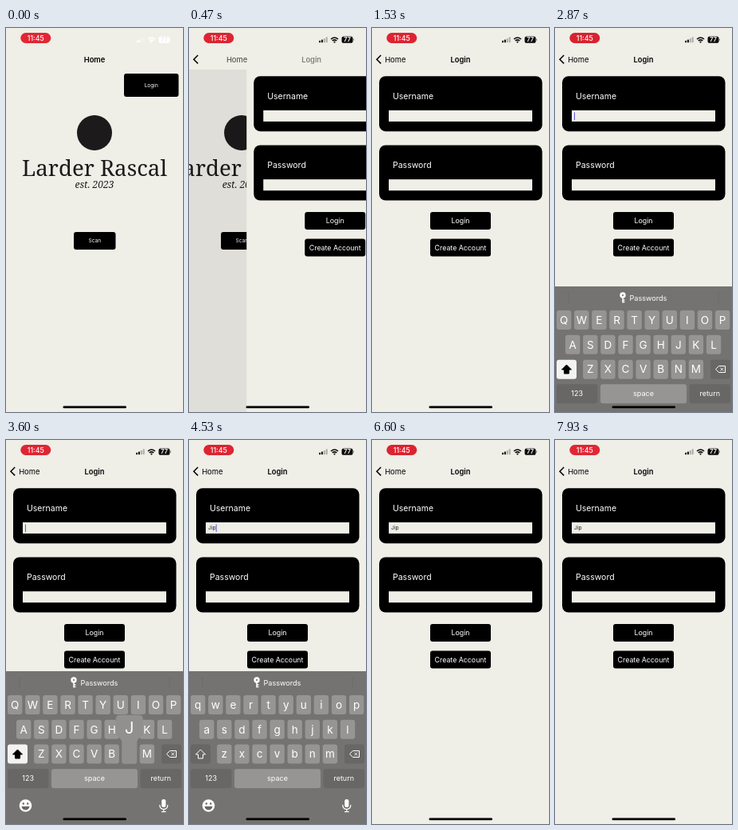
Write an HTML page that moves like this. It is 222 px wide and 480 px high and loops after 8000 ms.

```html
<!DOCTYPE html>
<html lang="en">
<head>
<meta charset="utf-8">
<title>Login flow</title>
<style>
html, body { margin: 0; width: 100%; height: 100%; overflow: hidden; background: #efeee7; }
svg { display: block; width: 100vw; height: 100vh; font-family: Inter, Roboto, sans-serif; }
.serif { font-family: "Noto Serif", serif; }
</style>
</head>
<body>
<svg id="stage" viewBox="0 0 222 480"></svg>
<script>
const BG = '#efeee7', KEY = '#969593', DARK_KEY = '#686765';
const LOOP = 8000, PUSH = 344, FOCUS = 2699, BLUR = 4800, LOWER = 3670;
const NAME = 'Jip';
// when each key bubble shows and hides
const TAPS = [[3590, 3720], [3930, 4060], [4330, 4460]];
const ROWS = ['QWERTYUIOP', 'ASDFGHJKL', 'ZXCVBNM'];
const rowX = [11.2, 22.2, 44.3], PITCH = 22.1;

const rect = (x, y, w, h, fill, r = 0, more = '') =>
  `<rect x="${x}" y="${y}" width="${w}" height="${h}" rx="${r}" fill="${fill}" ${more}/>`;
const text = (x, y, s, size, fill, more = '') =>
  `<text x="${x}" y="${y + size * .36}" font-size="${size}" fill="${fill}" text-anchor="middle" ${more}>${s}</text>`;
const left = (x, y, s, size, fill, more = '') =>
  text(x, y, s, size, fill, more).replace('middle', 'start');
const button = (x, y, w, h, s, size) =>
  rect(x, y, w, h, '#000', 3) + text(x + w / 2, y + h / 2, s, size, '#fff');
const card = (y, label) => rect(9, y, 204.5, 69, '#000', 8)
  + left(26, y + 24.9, label, 10.5, '#fff') + rect(21, y + 42.7, 180, 14, BG);

const home = `<g id="home">${rect(0, 0, 222, 480, BG)}
  ${button(148, 57, 68.5, 29, 'Login', 6.6)}
  <circle cx="111" cy="131" r="22" fill="#1c1a1a"/>
  <text class="serif" x="111" y="185" font-size="27.7" text-anchor="middle" fill="#1c1a1a">Larder Rascal</text>
  <text class="serif" x="111" y="199.5" font-size="12" font-style="italic" text-anchor="middle" fill="#1c1a1a">est. 2023</text>
  ${button(85, 255, 52.5, 22, 'Scan', 6.6)}
  ${rect(0, 0, 222, 480, '#000', 0, 'id="dim"')}</g>`;

const login = `<g id="login">${rect(0, 0, 222, 480, BG)}
  ${card(60.2, 'Username')}${card(146.5, 'Password')}
  ${left(24, 110, '', 6.8, '#222', 'id="field"')}
  ${rect(24, 105.5, 1, 9.5, '#5f57dc', 0, 'id="caret"')}
  ${button(73, 230, 76, 22, 'Login', 8.9)}${button(73, 263.5, 76, 22, 'Create Account', 8.8)}</g>`;

const header = rect(0, 0, 222, 52, BG)
  + '<path id="back" d="M11.2 34 6 39.2l5.2 5.2" fill="none" stroke="#000" stroke-width="1.5"/>'
  + text(0, 39.3, 'Home', 9.4, '#000', 'id="homeTitle"')
  + text(0, 39.3, 'Login', 9.3, '#000', 'id="loginTitle" font-weight="600"')
  + rect(18.3, 6, 38, 13, '#e2242f', 6.5, 'id="pill"')
  + text(37.3, 12.6, '11:45', 8.8, '#fff', 'font-weight="500"')
  + `<g id="status">${[2.4, 3.6, 5.2, 7].map((h, i) =>
      rect(163 + i * 2.9, 18.2 - h, 2, h, 'currentColor', .6, i > 1 ? 'opacity=".3"' : '')).join('')}
    <g fill="none" stroke="currentColor" stroke-width="1.6">
      <path d="M178 14q4.5-4 9 0M179.7 16q2.8-2.4 5.6 0"/></g>
    <circle cx="182.5" cy="17.6" r="1.1" fill="currentColor"/>
    ${rect(191.5, 10.4, 14, 8.4, 'currentColor', 2.6)}
    <path d="M206.3 13.2q1.4 1.4 0 2.8" fill="currentColor"/>
    ${text(198.5, 14.6, '77', 7.6, BG, 'font-weight="700"')}</g>`;

const keys = ROWS.map((row, r) => [...row].map((c, i) => {
  const x = rowX[r] + i * PITCH, y = 331 + r * 30.8;
  return rect(x - 9.2, y - 12, 18.4, 24, KEY, 3) + text(x, y, c, 13.5, '#fff', 'class="key"');
}).join('')).join('');

const keyboard = `<g id="keyboard">${rect(0, 289, 222, 200, '#747371')}
  ${rect(16.7, 296, .6, 14, '#696866')}${rect(204.7, 296, .6, 14, '#696866')}
  <g fill="none" stroke="#fff"><circle cx="85" cy="300" r="2.4" stroke-width="2.6"/>
    <path d="M85 303v6.5m0-1h2.4m-2.4-2.5h2.4" stroke-width="1.5"/></g>
  ${left(93.5, 303.5, 'Passwords', 9.1, '#fff')}
  ${keys}
  ${rect(2, 380.6, 25, 24, '#f3f3f2', 3, 'id="shift"')}
  <path id="arrow" d="M14.5 387l-6 6h3v5h6v-5h3z" stroke-linejoin="round"/>
  ${rect(195, 380.6, 25, 24, DARK_KEY, 3)}
  <path d="M205.5 388.5h8v8h-8l-4-4zm2 2.2 3.7 3.7m0-3.7-3.7 3.7" fill="none" stroke="#fff"/>
  ${rect(2, 411.3, 51.5, 24, DARK_KEY, 3)}${text(27.7, 423.2, '123', 9, '#fff')}
  ${rect(57, 411.3, 108, 24, KEY, 3)}${text(111, 423, 'space', 9, '#fff')}
  ${rect(168.5, 411.3, 51.5, 24, DARK_KEY, 3)}${text(194.2, 423, 'return', 9, '#fff')}
  <circle cx="24.5" cy="457" r="7.8" fill="#fff"/>
  <g fill="${DARK_KEY}"><circle cx="21.8" cy="454.5" r="1.2"/><circle cx="27.2" cy="454.5" r="1.2"/>
    <path d="M19.5 458h10q-1 4.5-5 4.5t-5-4.5z"/></g>
  ${rect(195.2, 449, 5.2, 10, '#fff', 2.6)}
  <path d="M192.8 456q0 5.5 5 5.5t5-5.5m-5 5.5v3.2m-2.8 0h5.6" fill="none" stroke="#fff" stroke-width="1.2"/>
  <g id="bubble"><path d="M-12-18h24q5 0 5 5V4c0 6-7.5 6-7.5 12V40q0 3-3 3H-6.5q-3 0-3-3V16C-9.5 10-17 10-17 4V-13q0-5 5-5z" fill="#91908e"/>
    ${text(0, -2, '', 20, '#fff', 'id="letter"')}</g></g>`;

stage.innerHTML = home + login + header + keyboard + rect(71.5, 472.6, 79.5, 2.6, '#000', 1.3);

const el = id => document.getElementById(id);
const set = (id, attrs) => { for (const k in attrs) el(id).setAttribute(k, attrs[k]); };
const move = (id, x, y) => set(id, { transform: `translate(${x} ${y})` });
const spring = ms => {
  const a = Math.max(0, ms) * .0183;
  return 1 - (1 + a) * Math.exp(-a);
};
const keyLabels = [...document.querySelectorAll('.key')];

function draw(t) {
  const p = spring(t - PUSH), q = 1 - p;
  move('home', -66.6 * p, 0);
  move('login', 222 * q, 0);
  set('dim', { opacity: .1 * p });
  set('back', { opacity: Math.min(1, p * 1.6) });
  set('homeTitle', { x: 111 - 81.7 * p ** 1.2, 'font-weight': p < .1 ? 600 : 400, opacity: 1 - p * q * 1.2 });
  set('loginTitle', { x: 111 + 131 * q, opacity: p * p });

  const ink = Math.min(1, Math.max(0, (t - 200) / 200));
  const shade = 255 - 243 * ink;
  set('status', { color: `rgb(${shade},${shade},${shade})` });
  const pulse = .5 - .5 * Math.cos(t * Math.PI / 1000);
  set('pill', { fill: `rgb(${226 - 10 * pulse},${38 - 4 * pulse},${52 - 4 * pulse})` });

  const up = spring(t - FOCUS) - spring(t - BLUR);
  move('keyboard', 0, 191 * (1 - up));
  const lower = t >= LOWER;
  const cased = c => lower ? c.toLowerCase() : c.toUpperCase();
  keyLabels.forEach(k => k.textContent = cased(k.textContent));
  set('shift', { fill: lower ? DARK_KEY : '#f3f3f2' });
  set('arrow', { fill: lower ? 'none' : '#000', stroke: lower ? '#fff' : '#000' });

  const typed = TAPS.filter(([on], i) => t >= (i ? on + 60 : LOWER)).length;
  el('field').textContent = NAME.slice(0, typed);
  set('caret', {
    x: 24 + (typed ? el('field').getComputedTextLength() : 0),
    opacity: t >= 2640 && t < BLUR ? 1 : 0
  });

  const tap = TAPS.findIndex(([on, off]) => t >= on && t < off);
  set('bubble', { opacity: tap < 0 ? 0 : 1 });
  if (tap >= 0) {
    const c = NAME[tap].toUpperCase(), r = ROWS.findIndex(row => row.includes(c));
    move('bubble', rowX[r] + ROWS[r].indexOf(c) * PITCH, 331 + r * 30.8);
    el('letter').textContent = cased(c);
  }
}

const start = performance.now();
function tick() {
  draw((performance.now() - start) % LOOP);
  requestAnimationFrame(tick);
}
tick();
</script>
</body>
</html>
```
